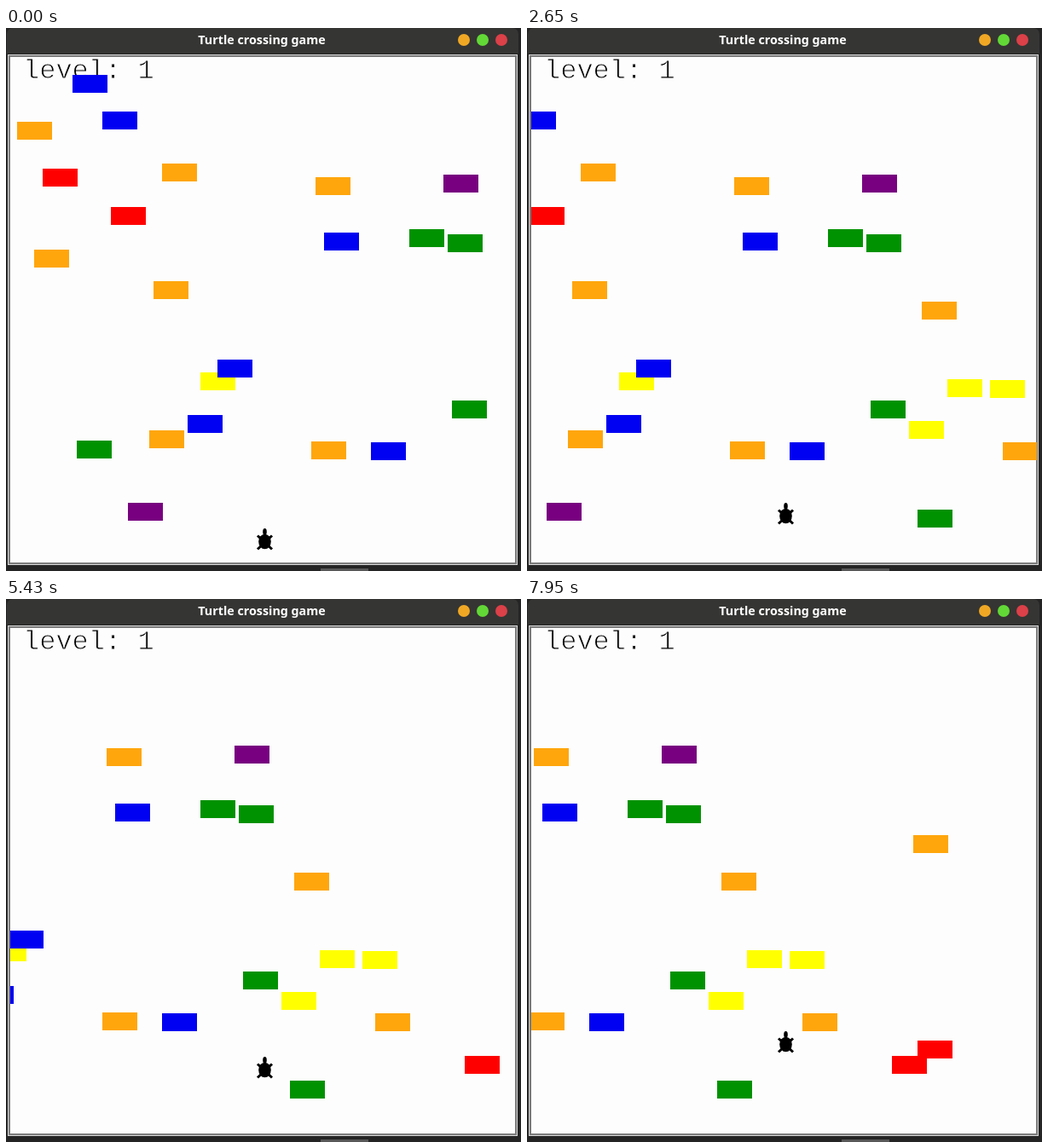
These frames come from a looping animation (604x637 px, 7.99 s). An HTML page with a canvas:

```html
<!DOCTYPE html>
<html lang="en">
<head>
<meta charset="utf-8">
<title>Turtle crossing game</title>
<style>
  html, body { margin: 0; width: 100%; height: 100%; overflow: hidden; background: #242424; }
  canvas { display: block; }
</style>
</head>
<body>
<canvas width="604" height="637"></canvas>
<script>
const ctx = document.querySelector('canvas').getContext('2d');
const LOOP = 7990;
const CAR_STEP = 5, SPAWN_X = 558;
const PAPER = '#fdfdfd';

// One starting point per car; those beyond SPAWN_X have yet to enter.
const CARS = {
  yellow: [[228, 404], [613, 412], [568, 461], [663, 413]],
  red: [[43, 165], [123, 210], [783, 536], [813, 518]],
  orange: [[13, 110], [183, 159], [363, 175], [33, 260], [173, 297], [168, 472],
    [358, 485], [583, 321], [678, 486], [808, 277]],
  purple: [[513, 172], [143, 557]],
  green: [[473, 236], [518, 242], [523, 437], [83, 484], [578, 565]],
  blue: [[78, 55], [113, 98], [373, 240], [248, 389], [213, 454], [428, 486]]
};

// How many evenly timed steps have been taken by time t.
function stepsTaken(t, first, interval, most = Infinity) {
  return Math.min(most, Math.max(0, 1 + Math.floor((t - first) / interval)));
}

function rect(color, x, y, w, h) {
  ctx.fillStyle = color;
  ctx.fillRect(x, y, w, h);
}

function ellipse(color, x, y, rx, ry = rx) {
  ctx.fillStyle = color;
  ctx.beginPath();
  ctx.ellipse(x, y, rx, ry, 0, 0, 2 * Math.PI);
  ctx.fill();
}

function text(str, x, y, font, color, align) {
  ctx.font = font;
  ctx.fillStyle = color;
  ctx.textAlign = align;
  ctx.fillText(str, x, y);
}

function drawWindow() {
  rect('#242424', 0, 0, 604, 637);
  ctx.fillStyle = '#353533';
  ctx.beginPath();
  ctx.roundRect(1, 0, 600, 40, [7, 7, 0, 0]);
  ctx.fill();
  text('Turtle crossing game', 300, 19, 'bold 14.3px "Noto Sans", sans-serif', '#fff', 'center');
  ['#f0a824', '#62d836', '#dc4048'].forEach((color, i) => ellipse(color, 537 + 22 * i, 14, 7));
  ['#242424', '#d9d9d9', '#7c7c7c', '#7c7c7c', PAPER].forEach((color, i) =>
    rect(color, 1 + i, 30 + i, 600 - 2 * i, 601 - 2 * i));
  rect('#585858', 369, 634, 56, 3);
}

function drawTurtle(x, y) {
  ellipse('#000', x, y - 1, 7.3, 8.8);
  ellipse('#000', x, y - 12.5, 2.3, 4);
  ctx.lineWidth = 3;
  ctx.beginPath();
  for (const side of [-1, 1]) {
    for (const end of [-1, 1]) {
      ctx.moveTo(x, y);
      ctx.lineTo(x + 8.5 * side, y + 8 * end);
    }
  }
  ctx.strokeStyle = '#000';
  ctx.stroke();
}

function draw(t) {
  const ticks = stepsTaken(t, 70, 111.55);
  const moves = stepsTaken(t, 600, 700, 5) + stepsTaken(t, 6000, 950, 3);
  drawWindow();
  ctx.save();
  ctx.beginPath();
  ctx.rect(5, 34, 593, 594);
  ctx.clip();
  text('level: 1', 20, 59, '32px "Liberation Mono", monospace', '#000', 'left');
  // Thin the strokes of the lettering.
  ctx.strokeStyle = PAPER;
  ctx.lineWidth = 1;
  ctx.strokeText('level: 1', 20, 59);
  const shades = { orange: '#ffa60c', green: '#009200', purple: '#780080', blue: '#0000f2' };
  for (const [name, cars] of Object.entries(CARS)) {
    for (const [x0, y] of cars) {
      const x = x0 - CAR_STEP * ticks;
      if (x <= SPAWN_X) rect(shades[name] || name, x, y, 41, 21);
    }
  }
  drawTurtle(303.5, 603.5 - 10 * moves);
  ctx.restore();
}

const start = performance.now();
function frame() {
  draw((performance.now() - start) % LOOP);
  requestAnimationFrame(frame);
}
frame();
</script>
</body>
</html>
```
